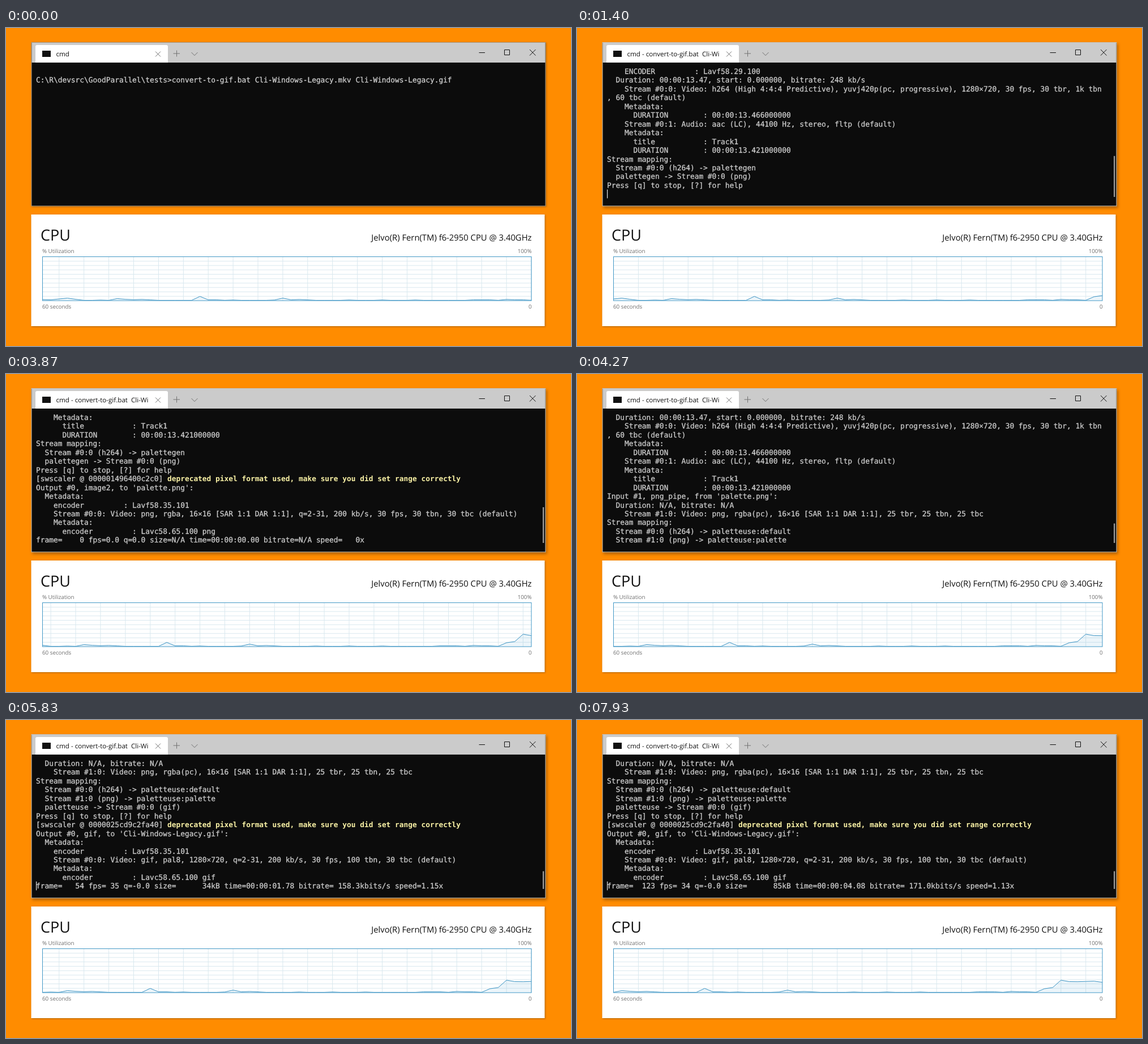
Recreate the animation shown at these times as an HTML page. Size 998 px wide and 561 px high, loop 8 s.

```html
<!DOCTYPE html>
<html lang="en">
<head>
<meta charset="utf-8">
<title>Terminal and CPU graph</title>
<style>
  html, body { margin: 0; width: 100%; height: 100%; overflow: hidden; background: #ff8c00; }
  svg { display: block; width: 100vw; height: 100vh; }
  text { white-space: pre; text-rendering: geometricPrecision; font-family: "Open Sans", "Noto Sans", sans-serif; fill: #111; }
  .row { font: 12.85px "DejaVu Sans Mono", monospace; fill: #ccc; stroke: #ccc; stroke-width: .3px; }
  .warn { fill: #f9f1a5; stroke: none; font-weight: bold; }
  .label { font-size: 9.8px; fill: #707070; }
  .tab { font-size: 11.6px; }
  .end { text-anchor: end; }
  .icon { fill: none; stroke: #111; }
  .soft { stroke: #707070; }
  .panel { fill: #fff; filter: drop-shadow(1px 1px 1.5px rgba(70, 40, 0, .45)); }
</style>
</head>
<body>
<svg viewBox="0 0 998 561">
  <rect width="998" height="561" fill="#ff8c00"/>

  <rect id="window" x="45" y="25.5" width="908" height="288.500" fill="#0c0c0c"/>
  <rect x="45.500" y="26" width="907" height="35" fill="#cbcbcb"/>
  <path d="M52 61V33q0-3 3-3H283q3 0 3 3V61z" fill="#fff"/>
  <rect x="64" y="40" width="15" height="11" fill="#111"/>
  <text id="tab" class="tab" x="88.500" y="50"></text>
  <path class="icon soft" d="M264 41.500l9 9m0-9l-9 9M295.500 45h11.500M301.500 39.500v11M327.500 43l5.500 5.500 5.500-5.500"/>
  <path class="icon" d="M835.500 43.500h10.500M880.500 38.500h9v9h-9zM925 38l10.500 10.500m0-10.500l-10.500 10.500"/>
  <g id="rows"></g>
  <rect id="cursor" width="1.200" height="15.500" fill="#e4e4e4"/>
  <rect id="thumb" x="948" width="2.300" fill="#9b9b9b"/>

  <rect class="panel" x="44.500" y="329" width="907" height="197"/>
  <text x="61" y="375" font-size="27">CPU</text>
  <text class="end" x="928.500" y="374.500" font-size="14.800">Jelvo(R) Fern(TM) f6-2950 CPU @ 3.40GHz</text>
  <text class="label" x="64" y="397">% Utilization</text>
  <text class="label end" x="928.500" y="397">100%</text>
  <text class="label" x="64" y="494.500">60 seconds</text>
  <text class="label end" x="928.500" y="494.500">0</text>
  <path id="grid" fill="none" stroke="#d9e8ef"/>
  <path id="area" fill="#117dbb" fill-opacity=".08"/>
  <path id="curve" fill="none" stroke="#3b93c3"/>
  <rect x="64.500" y="403.500" width="863.500" height="77.500" fill="none" stroke="#4398c6"/>
</svg>
<script>
const LOOP = 8000, ROWS = 15, COLS = 113;
const LEFT = 53, CELL = 7.737, LINE = 15.45;
const $ = id => document.getElementById(id);

// Terminal log
const prompt = 'C:\\R\\devsrc\\GoodParallel\\tests>';
const command = prompt + 'convert-to-gif.bat Cli-Windows-Legacy.mkv Cli-Windows-Legacy.gif';
const log = [];
const print = (...lines) => lines.forEach(s => log.push(...(s.match(/.{1,113}/g) || [''])));
const padTo = n => { while (log.length < n) log.push(''); };

const features = ('gpl version3 sdl2 fontconfig gnutls iconv libass libdav1d libbluray libfreetype libmp3lame ' +
  'libopencore-amrnb libopencore-amrwb libopenjpeg libopus libshine libsnappy libsoxr libsrt libtheora libtwolame ' +
  'libvpx libwavpack libwebp libx264 libx265 libxml2 libzimg lzma zlib gmp libvidstab libvmaf libvorbis ' +
  'libvo-amrwbenc libmysofa libspeex libxvid libaom libgsm avisynth libopenmpt libmfx ffnvcodec cuda-llvm cuvid ' +
  'd3d11va nvenc nvdec dxva2 amf').split(' ');
const libs = ['avutil      56. 38', 'avcodec     58. 65', 'avformat    58. 35', 'avdevice    58.  9',
  'avfilter     7. 70', 'swscale      5.  6', 'swresample   3.  6', 'postproc    55.  6'];
const banner = [
  'ffmpeg version git-2020 Copyright (c) 2000-2020 the FFmpeg developers',
  '  built with gcc 9.2.1 (GCC) 20200122',
  '  configuration: ' + features.map(f => '--enable-' + f).join(' '),
  ...libs.map(l => `  lib${l}.100 / ${l.slice(-7)}.100`),
  "Input #0, matroska,webm, from 'Cli-Windows-Legacy.mkv':",
  '  Metadata:',
  '    ENCODER         : Lavf58.29.100'
];
const bannerRows = banner.reduce((n, s) => n + Math.ceil(s.length / COLS), 0);
const source = [
  '  Duration: 00:00:13.47, start: 0.000000, bitrate: 248 kb/s',
  '    Stream #0:0: Video: h264 (High 4:4:4 Predictive), yuvj420p(pc, progressive), 1280×720, 30 fps, 30 tbr, 1k tbn',
  ', 60 tbc (default)',
  '    Metadata:',
  '      DURATION        : 00:00:13.466000000',
  '    Stream #0:1: Audio: aac (LC), 44100 Hz, stereo, fltp (default)',
  '    Metadata:',
  '      title           : Track1',
  '      DURATION        : 00:00:13.421000000'
];
const output = (address, target, stream, codec) => [
  'Press [q] to stop, [?] for help',
  `[swscaler @ ${address}] deprecated pixel format used, make sure you did set range correctly`,
  `Output #0, ${target}:`,
  '  Metadata:',
  '    encoder         : Lavf58.35.101',
  `    Stream #0:0: Video: ${stream} (default)`,
  '    Metadata:',
  `      encoder         : Lavc58.65.100 ${codec}`,
  ''
];

print('', command, '', prompt + 'set palette=palette.png', '', prompt + 'set filters=fps=30', '',
  prompt + 'ffmpeg -y -i Cli-Windows-Legacy.mkv -vf palettegen palette.png');
padTo(34 - bannerRows);
print(...banner, ...source, 'Stream mapping:', '  Stream #0:0 (h264) -> palettegen', '  palettegen -> Stream #0:0 (png)',
  ...output('000001496400c2c0', "image2, to 'palette.png'",
    'png, rgba, 16×16 [SAR 1:1 DAR 1:1], q=2-31, 200 kb/s, 30 fps, 30 tbn, 30 tbc', 'png'));
const firstProgress = log.length - 1;
print('video:1kB audio:0kB subtitle:0kB other streams:0kB global headers:0kB muxing overhead: unknown', '',
  prompt + 'ffmpeg -y -i Cli-Windows-Legacy.mkv -i palette.png -lavfi paletteuse Cli-Windows-Legacy.gif');
padTo(86 - bannerRows);
print(...banner, ...source, "Input #1, png_pipe, from 'palette.png':", '  Duration: N/A, bitrate: N/A',
  '    Stream #1:0: Video: png, rgba(pc), 16×16 [SAR 1:1 DAR 1:1], 25 tbr, 25 tbn, 25 tbc',
  'Stream mapping:', '  Stream #0:0 (h264) -> paletteuse:default', '  Stream #1:0 (png) -> paletteuse:palette',
  '  paletteuse -> Stream #0:0 (gif)',
  ...output('0000025cd9c2fa40', "gif, to 'Cli-Windows-Legacy.gif'",
    'gif, pal8, 1280×720, q=2-31, 200 kb/s, 30 fps, 100 tbn, 30 tbc', 'gif'));
const secondProgress = log.length - 1;

const encoding = (frame, fps, kB, rate, speed) =>
  `frame=${String(frame).padStart(5)} fps=${fps.padStart(3)} q=-0.0 size=${String(kB).padStart(8)}kB ` +
  `time=00:00:0${((frame - .6) / 30).toFixed(2)} bitrate=${rate.padStart(6)}kbits/s speed=${speed}x`;

// Time tables: [ms, value...]
const screens = [ // lines printed, cursor shown, empty line below
  [0, 2, 0], [930, 2, 1], [1130, 2, 1, 1], [1170, 8, 0], [1200, 14, 0], [1300, 32, 0], [1400, 47, 1, 1], [1430, 50, 0],
  [1500, 55, 1], [1670, 55, 0], [2200, 55, 1], [2770, 55, 0], [3300, 55, 1], [3870, 55, 0],
  [3970, 59, 0], [4000, 74, 0], [4030, 82, 0], [4230, 87, 0], [4270, 101, 0], [4300, 103, 0], [4330, 106, 0],
  [4370, 109, 0], [4400, 111, 1], [4970, 111, 0], [5500, 111, 1], [6070, 111, 0], [6630, 111, 1],
  [7170, 111, 0], [7700, 111, 1]
];
const firstSteps = [
  [0, ''],
  [1900, 'frame=    0 fps=0.0 q=0.0 size=N/A time=00:00:00.00 bitrate=N/A speed=   0x'],
  [3970, 'frame=    1 fps=0.4 q=-0.0 Lsize=N/A time=00:00:00.03 bitrate=N/A speed=0.0131x']
];
const secondSteps = [
  [0, ''],
  [4800, encoding(20, '0.0', 11, '139.4', '1.28')],
  [5330, encoding(37, '36', 22, '148.5', '1.17')],
  [5830, encoding(54, '35', 34, '158.3', '1.15')],
  [6370, encoding(71, '35', 46, '160.6', '1.15')],
  [6870, encoding(88, '34', 59, '165.9', '1.14')],
  [7400, encoding(106, '34', 72, '168.0', '1.13')],
  [7930, encoding(123, '34', 85, '171.0', '1.13')]
];
const shifts = [[0, 0], [270, 1], [1230, 2], [2270, 3], [3270, 4], [4230, 5], [5270, 6], [6300, 7], [7230, 8]];
const focus = [[0, 0], [870, .5], [930, 1]];
const titles = [[0, 'cmd'], [1130, 'cmd - convert-to-gif.bat  Cli-Wi']];
const at = (table, t) => table.findLast(step => step[0] <= t);

// CPU load in pixels above the axis; unlisted samples idle
const load = Array(68).fill(.6);
const put = (start, ...values) => values.forEach((v, i) => load[start + i] = v);
put(0, 2, 1.5, 3, 4.5, 2.4);
put(7, 1.1);
put(9, 3.6, 2.4, 1.7, 2.2, 1.4);
put(19, 7.5, 1.5, 1.5, .7, 1.2);
put(28, 1.2, 4.5, 1.5, 2.1, 1.4);
for (const i of [37, 41, 45]) put(i, 1.2);
put(52, 1.5, 1.5, 1.5, .7, 2.2, 1.6, 1.5, .7, 6.9, 9, 22, 19.5, 19.3, 19.8, 20.3, 18.2);

const CHART = { x: 64.5, y: 403.5, w: 863.5, h: 77.5 };
const sampleStep = CHART.w / 59, bottom = CHART.y + CHART.h;

function drawChart(shift) {
  let grid = '';
  for (let i = 1; i < 10; i++) grid += `M${CHART.x} ${CHART.y + CHART.h * i / 10}h${CHART.w}`;
  for (let i = (11 - shift) % 3; i < 60; i += 3) grid += `M${CHART.x + i * sampleStep} ${CHART.y}v${CHART.h}`;
  const points = load.slice(shift, shift + 60)
    .map((v, i) => `${(CHART.x + i * sampleStep).toFixed(2)} ${(bottom - v).toFixed(2)}`).join('L');
  $('grid').setAttribute('d', grid);
  $('curve').setAttribute('d', 'M' + points);
  $('area').setAttribute('d', `M${CHART.x} ${bottom}L${points}V${bottom}z`);
}

const rows = Array.from({ length: ROWS }, (_, i) => {
  const row = document.createElementNS('http://www.w3.org/2000/svg', 'text');
  row.setAttribute('class', 'row');
  row.setAttribute('x', LEFT);
  row.setAttribute('y', 81 + i * LINE);
  return $('rows').appendChild(row);
});
const escape = s => s.replace(/&/g, '&amp;').replace(/</g, '&lt;').replace(/>/g, '&gt;');
const markup = s => escape(s).replace(/deprecated.*/, '<tspan class="warn">$&</tspan>');

function drawTerminal(printed, cursorOn, below) {
  const total = printed + below;
  const first = Math.max(0, total - ROWS);
  rows.forEach((row, i) => row.innerHTML = first + i < printed ? markup(log[first + i]) : '');

  const cursorCol = total === 2 ? command.length : 0;
  const cursor = $('cursor');
  cursor.setAttribute('x', LEFT + cursorCol * CELL);
  cursor.setAttribute('y', 68.6 + (total - first - 1) * LINE);
  cursor.style.display = cursorOn ? '' : 'none';

  const height = 231 * ROWS / total, thumb = $('thumb');
  thumb.setAttribute('y', 298 - height);
  thumb.setAttribute('height', height);
  thumb.style.display = total > ROWS ? '' : 'none';
}

function drawFocus(f) {
  const win = $('window');
  win.style.filter = `drop-shadow(${1 + f}px ${1 + 2 * f}px ${1.5 + f}px rgba(70,40,0,.45))`;
  win.style.stroke = f ? '#c4c2bc' : '#a59a88';
}

let last = '';
function render(t) {
  const [, printed, cursorOn, below = 0] = at(screens, t);
  const [shift, lit, title, a, b] = [shifts, focus, titles, firstSteps, secondSteps].map(table => at(table, t)[1]);
  const state = [printed, cursorOn, below, shift, lit, title, a, b].join('|');
  if (state === last) return;
  last = state;
  log[firstProgress] = a;
  log[secondProgress] = b;
  $('tab').textContent = title;
  drawTerminal(printed, cursorOn, below);
  drawChart(shift);
  drawFocus(lit);
}

const start = performance.now();
function tick() {
  render((performance.now() - start) % LOOP);
  requestAnimationFrame(tick);
}
tick();
</script>
</body>
</html>
```
